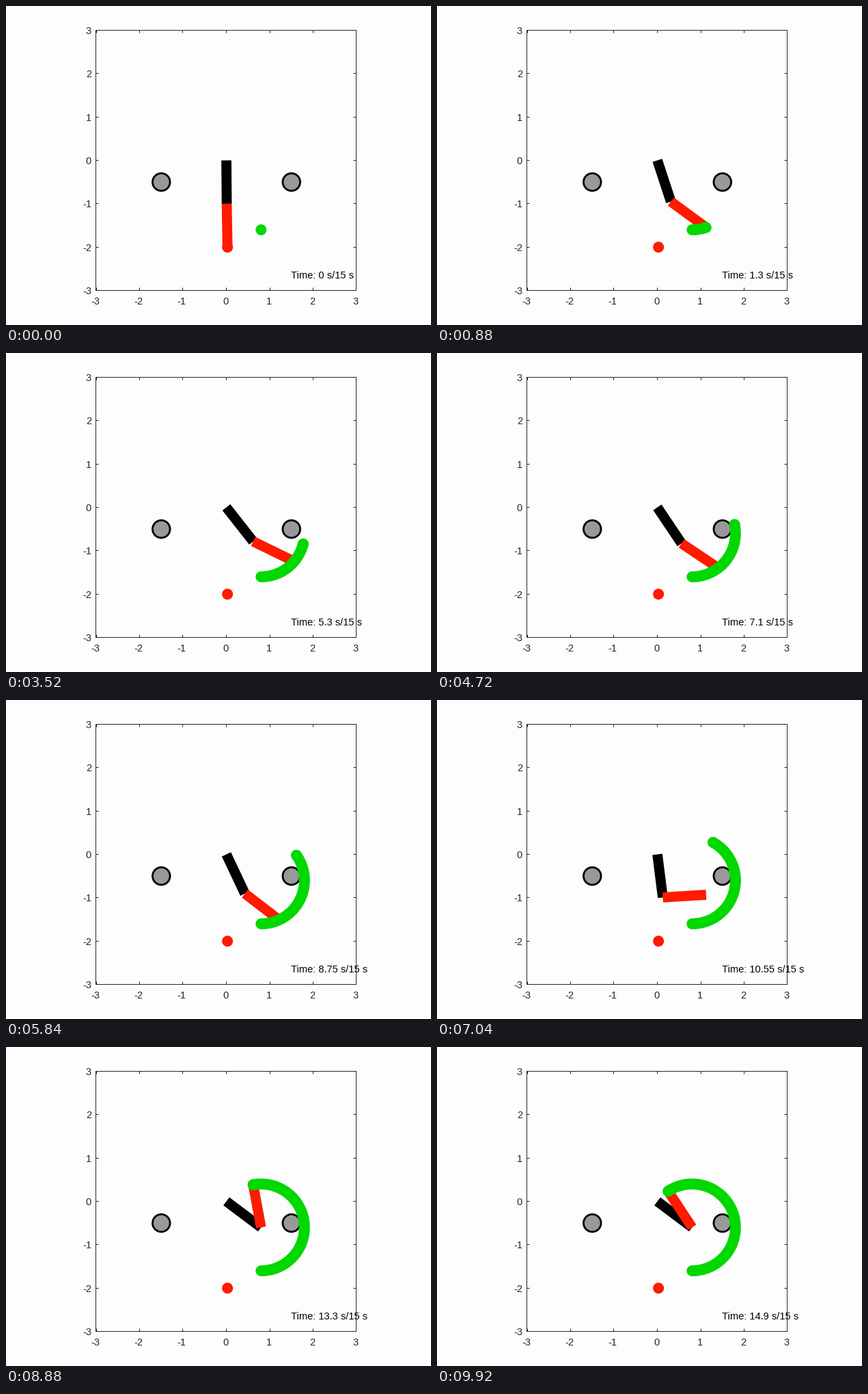
A matplotlib script that plays this animation: 622x466 px, repeating every 10 s.

```python
import numpy as np
import matplotlib.pyplot as plt
from matplotlib.animation import FuncAnimation
from matplotlib.patches import Circle

W, H, DPI = 622, 466, 100
PX = 72 / DPI                      # one pixel in points
FRAMES, INTERVAL = 125, 80
X0, Y0, SX, SY = 322, 225, 63.5, 63.4
BG, INK = "#fdfdfd", "#262626"
RED, GREEN, GREY = "#ff1a00", "#00d800", "#999999"
SPEED = 0.25                       # goal's angular speed, rad/s
CENTRE = np.array([0.8, -0.6])     # centre of the goal's unit circle

plt.rcParams["font.family"] = "Liberation Sans"
FONT = 14.67 * PX


def to_px(x, y):
    return X0 + SX * x, Y0 - SY * y


def goal(t):
    return CENTRE[0] + np.sin(SPEED * t), CENTRE[1] - np.cos(SPEED * t)


def chase(t):
    """Start: the upper link turns with the goal, the lower one settles."""
    return t, 0.5 + 13.6 * t, 55 - 54 * np.exp(-t / 0.35)


def orbit(t):
    """End: the elbow rests on the circle's centre, the lower link follows."""
    rest = np.degrees(np.arctan2(CENTRE[0], -CENTRE[1]))
    return t, rest, np.degrees(SPEED * t)


# Key poses: time (s), upper and lower link angle from straight down (deg)
DETOUR = [(5.3, 38.2, 64), (8.75, 25.3, 52.5), (9.5, 19.5, 57),
          (10.55, 7.2, 93.5), (11.3, 40, 153)]
KEYS = np.array([chase(t) for t in np.arange(0, 2.8, 0.25)] + DETOUR
                + [orbit(t) for t in np.arange(12.2, 15.2, 0.4)])
SLOPES = np.gradient(KEYS, KEYS[:, 0], axis=0)


def pose(t):
    """Smooth curve through the key poses, in radians."""
    times = KEYS[:, 0]
    i = np.clip(np.searchsorted(times, t, side="right") - 1, 0, len(times) - 2)
    h = times[i + 1] - times[i]
    u = (t - times[i]) / h
    s = u * u * (3 - 2 * u)
    angles = ((1 - s) * KEYS[i] + s * KEYS[i + 1]
              + h * u * (1 - u) * ((1 - u) * SLOPES[i] - u * SLOPES[i + 1]))
    return np.radians(angles[1:])


def arm(t):
    a, b = pose(t)
    elbow = np.array([np.sin(a), -np.cos(a)])
    return elbow, elbow + [np.sin(b), -np.cos(b)]


fig = plt.figure(figsize=(W / DPI, H / DPI), dpi=DPI, facecolor=BG)
ax = fig.add_axes([0, 0, 1, 1])
ax.set_xlim(-0.5, W - 0.5)
ax.set_ylim(H - 0.5, -0.5)
ax.axis("off")


def stroke(xs, ys, color, width, z, cap="butt"):
    line, = ax.plot(xs, ys, color=color, lw=width * PX, zorder=z, snap=False,
                    solid_capstyle=cap, solid_joinstyle="round")
    return line


def dot(x, y, color, z):
    patch = Circle(to_px(x, y), 8, fc=color, ec="none", zorder=z)
    ax.add_patch(patch)
    return patch


def write(x, y, text, align, color=INK):
    return ax.text(x, y, text, ha=align, va="baseline", color=color,
                   fontsize=FONT, zorder=8)


def draw_axes():
    left, right, top, bottom = 131, 512, 35, 415
    stroke([left, right, right, left, left],
           [top, top, bottom, bottom, top], INK, 1, 1, "projecting")
    for v in range(-3, 4):
        x, y = to_px(v, v)
        x, y = np.clip(round(x), left, right), np.clip(round(y), top, bottom)
        for edge, step in ((top, 4), (bottom, -4)):
            stroke([x, x], [edge, edge + step], INK, 1, 1)
        for edge, step in ((left, 4), (right, -4)):
            stroke([edge, edge + step], [y, y], INK, 1, 1)
        write(x - 1.2, 435.5, str(v), "center")
        write(124.5, y + 5.3, str(v), "right")


draw_axes()
for cx in (-1.5, 1.5):
    ax.add_patch(Circle(to_px(cx, -0.5), 12.8, fc=GREY, ec="black",
                        lw=2.8 * PX, zorder=2))

upper = stroke([], [], "black", 14.7, 3)
lower = stroke([], [], RED, 14.7, 4)
dot(*arm(0)[1], RED, 5)
trail = stroke([], [], GREEN, 16, 6, "round")
head = dot(*goal(0), GREEN, 6)
label = write(416.7, 398, "", "left", "black")


def update(n):
    t = round(n * 0.12 / 0.05) * 0.05      # clock ticks in 0.05 s steps
    elbow, tip = arm(t)
    base, mid, end = to_px(0, 0), to_px(*elbow), to_px(*tip)
    upper.set_data(*zip(base, mid))
    lower.set_data(*zip(mid, end))
    trail.set_data(*to_px(*goal(np.linspace(0, t, 6 * n + 2))))
    head.center = to_px(*goal(t))
    label.set_text(f"Time: {t:g} s/15 s")
    return upper, lower, trail, head, label


anim = FuncAnimation(fig, update, frames=FRAMES, interval=INTERVAL,
                     init_func=lambda: update(0), repeat=True, repeat_delay=0,
                     blit=False)
plt.show()
```
